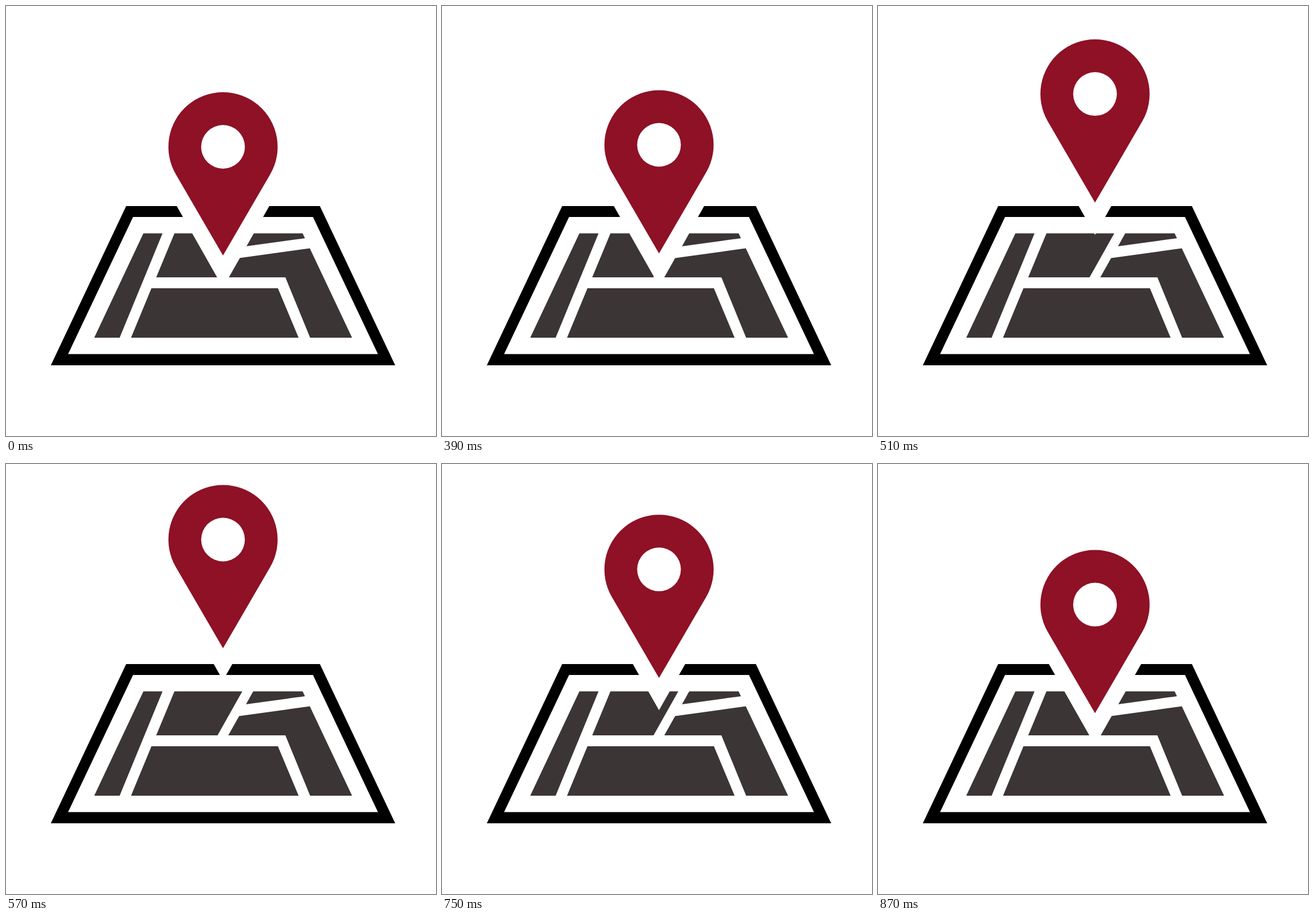
These frames come from a looping animation (748x748 px, 0.9 s). An HTML page:

```html
<!DOCTYPE html>
<html lang="en">
<head>
<meta charset="utf-8">
<title>Map pin</title>
<style>
  html, body { margin: 0; width: 100%; height: 100%; overflow: hidden; background: #fff; }
  svg { display: block; width: 100vw; height: 100vh; }
</style>
</head>
<body>
<svg viewBox="0 0 748 748">
  <path fill-rule="evenodd" d="M209 348H546L677 625H78ZM221 367H534L647 605.5H108Z"/>
  <g fill="#3c3535">
    <path d="M239 395.5H272.3L197.7 577H153.5Z"/>
    <path d="M293 395.5H411L368 472H261.3Z"/>
    <path d="M430 395.5H516L520 404L417.5 418Z"/>
    <path d="M405.5 438.5L528.5 421.5L602 577H529L486 472H386.7Z"/>
    <path d="M253 491H473L509 577H217.5Z"/>
  </g>
  <g id="pin">
    <path fill="#fff" d="M377.5 490L264.1 290H490.9Z"/>
    <path fill="#8e1126" d="M377.5 434L295.4 292.8A95 95 0 1 1 459.6 292.8Z"/>
    <circle cx="377.5" cy="245" r="38" fill="#fff"/>
  </g>
</svg>
<script>
const LOOP = 900, STEP = 30, HOLD = 11;
const pin = document.getElementById('pin');

function ease(u) {
  u = Math.min(1, Math.max(0, u));
  return u < 0.5 ? 4 * u ** 3 : 1 - 4 * (1 - u) ** 3;
}

// Height of the pin above its resting place, n steps into the hop
function lift(n) {
  if (n < 0) return 0;
  const up = ease((n - 0.29) / 9.05);
  const down = ease((n - 9.84) / 8.52);
  return 0.4 + 114.6 * (up - down);
}

const start = performance.now();
function draw() {
  const t = (performance.now() - start) % LOOP;
  const n = Math.floor(t / STEP) - HOLD;
  pin.setAttribute('transform', `translate(0 ${-lift(n)})`);
  requestAnimationFrame(draw);
}
draw();
</script>
</body>
</html>
```
